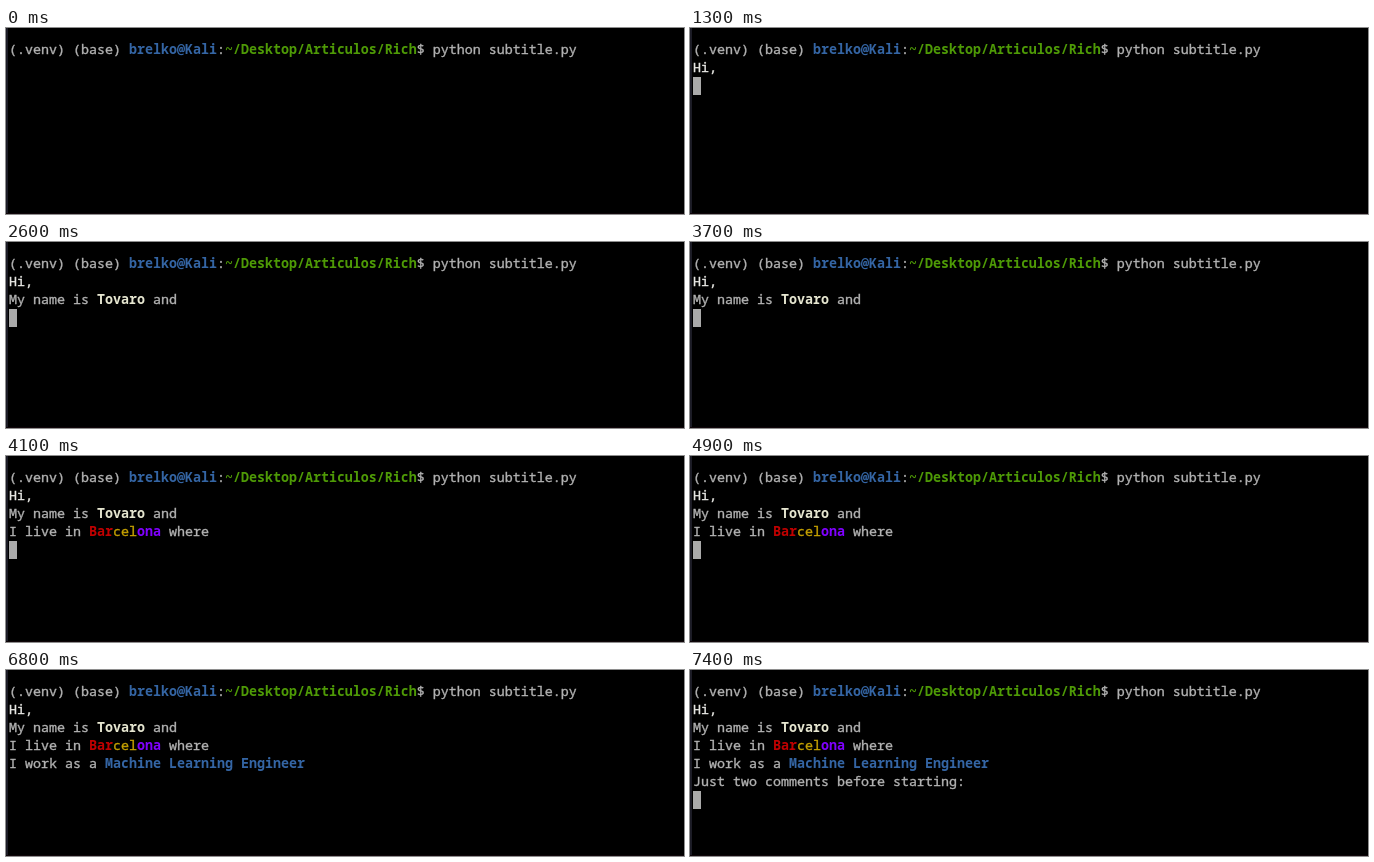
These frames come from a looping animation (678 by 186 pixels, 8000 ms). An HTML page:

```html
<!DOCTYPE html>
<html lang="en">
<head>
<meta charset="utf-8">
<title>Terminal subtitles</title>
<style>
  html, body { margin: 0; width: 100%; height: 100%; overflow: hidden; background: #000; }
  svg { display: block; }
  text {
    font: 13.3333px "Noto Sans Mono", "DejaVu Sans Mono", monospace;
    font-variant-ligatures: none;
    white-space: pre;
    color: #b2b2b2;
  }
  /* A thin outline gives the regular weight its sturdier stems. */
  text, tspan { fill: currentColor; stroke: currentColor; stroke-width: .35px; }
  .b { font-weight: 700; stroke: none; }
  .blue { color: #3465a4; }
  .green { color: #4e9a06; }
  .white { color: #e6e6e2; }
  .cream { color: #e6e6d0; }
  .red { color: #c00000; }
  .yellow { color: #c4a000; }
  .violet { color: #8000ff; }

  /* Cover and cursor drop one row per printed line. */
  .cover { animation: row 8s step-end infinite; }
  .cursor { fill: #aaa; animation: row 8s step-end infinite, blink 8s step-end infinite; }
  @keyframes row {
    0% { transform: translateY(0); }
    13.75% { transform: translateY(18px); }
    32.5% { transform: translateY(36px); }
    51.25% { transform: translateY(54px); }
    70% { transform: translateY(72px); }
    88.75%, 100% { transform: translateY(90px); }
  }
  @keyframes blink {
    0%, 8.75%, 23.75%, 38.75%, 53.75%, 70%, 85%, 100% { opacity: 0; }
    1.25%, 16.25%, 31.25%, 46.25%, 61.25%, 77.5%, 92.5% { opacity: 1; }
  }
</style>
</head>
<body>
<svg width="678" height="186" viewBox="0 0 678 186">
  <rect width="678" height="186"/>
  <text x="3" y="26">(.venv) (base) <tspan class="b blue">brelko@Kali</tspan>:<tspan class="b green">~/Desktop/Articulos/Rich</tspan>$ python subtitle.py</text>
  <text x="3" y="44" class="white">Hi,</text>
  <text x="3" y="62">My name is <tspan class="b cream">Tovaro</tspan> and</text>
  <text x="3" y="80">I live in <tspan class="b red">Bar</tspan><tspan class="yellow">cel</tspan><tspan class="b violet">ona</tspan> where</text>
  <text x="3" y="98">I work as a <tspan class="b blue">Machine Learning Engineer</tspan></text>
  <text x="3" y="116">Just two comments before starting:</text>
  <rect class="cover" y="31" width="678" height="155"/>
  <rect class="cursor" x="3" y="31" width="8" height="18"/>
  <rect width="2" height="186" fill="#1c1c26"/>
  <rect y="185" width="678" height="1" fill="#10060a"/>
</svg>
</body>
</html>
```
